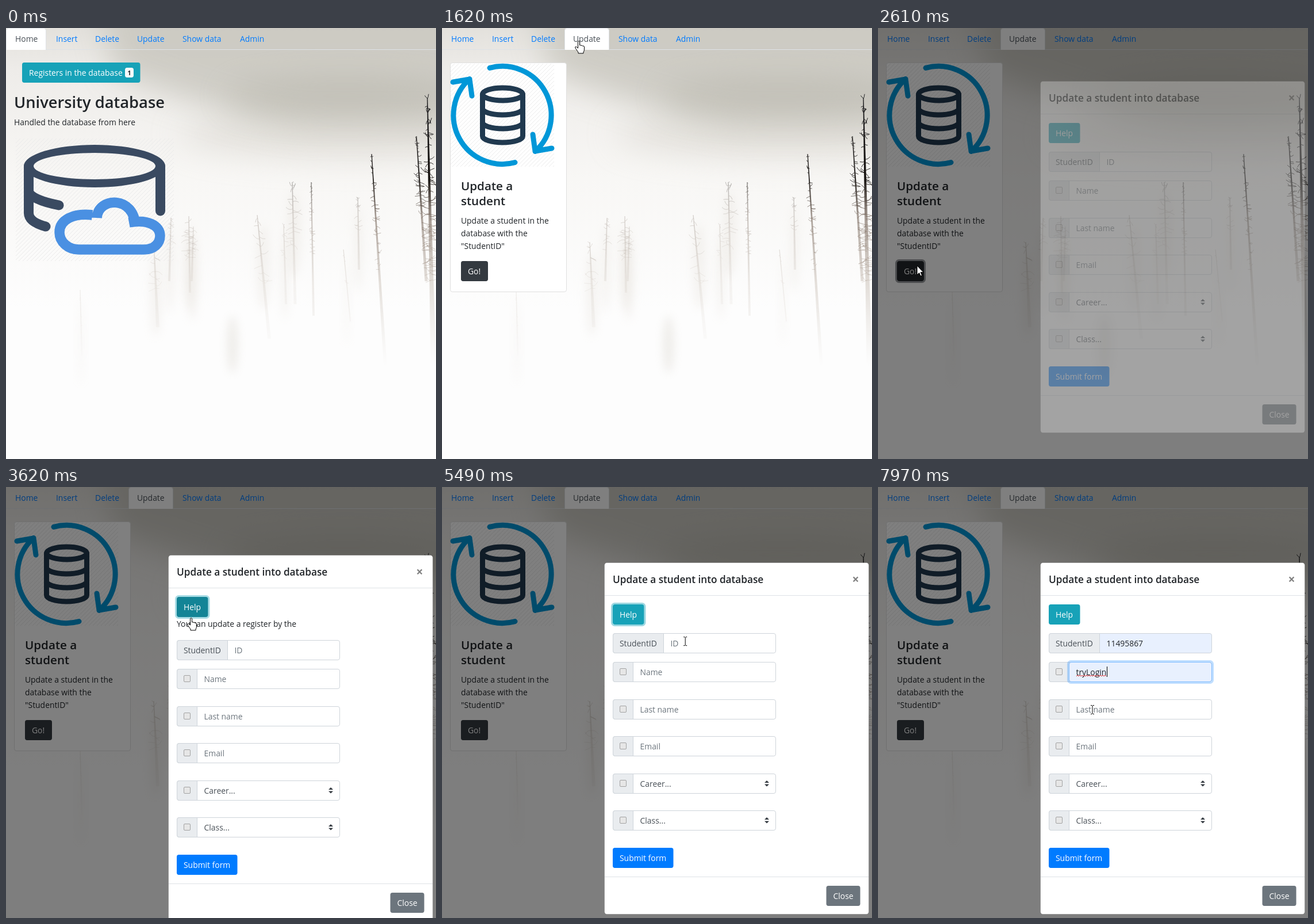
An HTML page that plays this animation: 748x749 px, repeating every 8000 ms.

```html
<!DOCTYPE html>
<html lang="en">
<head>
<meta charset="utf-8">
<title>University database</title>
<style>
html, body { margin: 0; height: 100%; overflow: hidden; background: #fff; }
svg { display: block; width: 748px; height: 749px; }
text { font: 13.9px "Open Sans", "Noto Sans", sans-serif; fill: #212529; white-space: pre; }
.semi { font-weight: 600; }
.bold { font-weight: 700; }
.link { fill: #007bff; }
.white { fill: #fff; }
.gray { fill: #495057; }
.hint { fill: #6c757d; }
.item { font-size: 12px; fill: #111; }
.line { stroke: #dee2e6; }
.box { fill: #fff; stroke: #ced4da; }
.addon { fill: #e9ecef; stroke: #ced4da; }
.round { fill: none; stroke-linecap: round; stroke-linejoin: round; }
#list { filter: drop-shadow(0 2px 2px rgba(0,0,0,.3)); }
</style>
</head>
<body>
<script>
const LOOP = 8000;
const clamp = v => Math.max(0, Math.min(1, v));
const text = (x, y, s, cls = '', more = '') => `<text x="${x}" y="${y}" class="${cls}" ${more}>${s}</text>`;
const rect = (x, y, w, h, more = '') => `<rect x="${x}" y="${y}" width="${w}" height="${h}" ${more}/>`;
const button = (id, x, y, w, fill, label, h = 35) =>
  rect(x, y, w, h, `id="${id}" rx="3.7" fill="${fill}"`) + text(x + 12, y + 23, label, 'white');
const ring = (id, x, y, w, h, glow, edge = 'none') => `<g id="${id}" fill="none" opacity="0">
  ${rect(x - 1.5, y - 1.5, w + 3, h + 3, `rx="5" stroke="${glow}" stroke-width="3"`)}
  ${rect(x + .5, y + .5, w - 1, h - 1, `rx="3.5" stroke="${edge}"`)}</g>`;

// Foggy forest: each tree is a tapered trunk with random twigs; distant ones are blurred and stand in mist
let seed = 7;
const rnd = () => (seed = seed * 16807 % 2147483647) / 2147483647;
function tree([x, y, x2, y2, width, alpha, reach, twigs]) {
  const far = alpha < .6;
  let d = '';
  for (let i = 0; i < twigs; i++) {
    const k = rnd() * .55, side = i % 2 ? 1 : -1;
    const len = reach * (.35 + .65 * rnd()) * Math.min(1, .3 + k * 3) * side;
    d += `M${x + (x2 - x) * k} ${y + (y2 - y) * k}q${len / 2} ${reach * (rnd() - .4) * .5} ${len} ${reach * (rnd() - .5)}`;
  }
  const mist = `<ellipse cx="${(x + x2) / 2}" cy="${y + 90}" rx="${reach * .7}" ry="75" fill="#d8d0c6" opacity=".22" filter="url(#soft)"/>`;
  return `${far ? mist : ''}<g opacity="${alpha}" ${far ? 'filter="url(#haze)"' : ''}>
    <path d="M${x - .6} ${y}h1.2L${x2 + width / 2} ${y2}h${-width}Z" fill="url(#bark)"/>
    <path d="${d}" fill="none" stroke="url(#bark)" stroke-width=".9"/></g>`;
}
const trees = [
  [733, 122, 746, 700, 12, 1, 16, 110], [714, 188, 731, 440, 5, .9, 10, 40],
  [636, 219, 660, 590, 6, .95, 8, 40], [531, 268, 535, 500, 4, .6, 6, 36],
  [498, 268, 503, 480, 5, .32, 17, 26], [483, 342, 487, 480, 4, .32, 9, 12],
  [437, 325, 458, 540, 6, .45, 16, 16], [318, 327, 320, 460, 4, .42, 14, 22],
  [326, 345, 323, 440, 4, .35, 12, 14], [287, 330, 284, 440, 4, .42, 10, 14],
  [257, 372, 264, 520, 6, .5, 14, 18], [612, 294, 614, 420, 4, .35, 9, 18],
  [587, 385, 599, 510, 2, .5, 4, 6], [129, 455, 132, 570, 3, .58, 4, 4]
].map(tree).join('');

const photo = `${rect(0, 0, 748, 749, 'fill="url(#fog)"')}
  <ellipse cx="600" cy="185" rx="300" ry="40" fill="#d9d6cf" opacity=".6" filter="url(#blur)"/>
  <path d="M150 -80H900V172H520C400 160 300 118 190 80Z" fill="#c9c7bf" opacity=".85" filter="url(#blur)"/>
  <ellipse cx="590" cy="118" rx="210" ry="32" fill="#aeaca0" opacity=".4" filter="url(#blur)"/>
  <ellipse cx="394" cy="550" rx="9" ry="50" fill="#dcd8d0" opacity=".45" filter="url(#soft)"/>${trees}`;

const tabs = [['Home', 16], ['Insert', 87], ['Delete', 155], ['Update', 228], ['Show data', 307], ['Admin', 407]];
const tabShape = (x, w) => `M${x + .5} 38V4.5q0 -4 4 -4H${x + w - 4.5}q4 0 4 4V38`;
const nav = `<path d="M0 37.5H748" class="line"/>
  <path id="tabHover" d="${tabShape(213, 78)}" fill="none" stroke="#e9ecef"/>
  <path id="tab" fill="#fff" class="line"/>` + tabs.map(([s, x], i) => text(x, 24, s, 'link', `id="nav${i}"`)).join('');

const home = `<g id="home">${button('registers', 28, 60, 205.5, '#17a2b8', 'Registers in the database')}
  ${rect(207, 69, 15, 17, 'rx="3.7" fill="#f8f9fa"')}
  ${text(214.5, 81.5, '1', 'bold', 'text-anchor="middle" style="font-size:10.5px"')}
  ${text(14, 139, 'University database', 'semi', 'style="font-size:27.3px"')}
  ${text(14, 169, 'Handled the database from here')}
  ${rect(17, 192, 275, 213, 'fill="url(#hatch)"')}
  <path fill="#3a4a61" fill-rule="evenodd" d="M31 240a123 37 0 0 1 246 0a123 37 0 0 1 -246 0ZM48 240a106 23 0 0 0 212 0a106 23 0 0 0 -212 0Z"/>
  <path class="round" stroke="#3a4a61" stroke-width="17" d="M268.500 240V318M39.500 240V322Q40 337 69 345M39.500 285Q46 299 92 308"/>
  <path fill="none" stroke="#4a90e2" stroke-width="17.500" d="M150 325C118 321 93 333 93 355C93 372 108 385 127 385H240C258 385 268 374 268 361C268 343 246 332 214 338M158 330C160 293 224 291 225 345"/></g>`;

const card = `<g id="card">${rect(14.5, 60.5, 202, 398, 'rx="3.7" fill="#fff" stroke="#dfdfdf"')}
  ${rect(15, 62, 180, 179, 'fill="url(#hatch)"')}
  <path class="round" stroke="#0097d8" stroke-width="9" d="M127 233.600A85 85 0 0 1 48 88.400M19 94L48 89L52 118M83 69.400A85 85 0 0 1 162 214.600M191 209L162 214L158 185"/>
  <g class="round" stroke="#20394f" stroke-width="9"><ellipse cx="105.500" cy="115" rx="35" ry="11"/>
  <path d="M70.500 115V188a35 11 0 0 0 70 0V115M70.500 140a35 11 0 0 0 70 0M70.500 164a35 11 0 0 0 70 0"/></g>
  ${text(33, 282, 'Update a', 'semi', 'style="font-size:20.6px"')}
  ${text(33, 308, 'student', 'semi', 'style="font-size:20.6px"')}
  ${['Update a student in the', 'database with the', '"StudentID"'].map((s, i) => text(33, 340 + 22 * i, s)).join('')}
  ${ring('goRing', 33, 405, 47, 35, 'rgba(52,58,64,.5)')}${button('go', 33, 405, 47, '#343a40', 'Go!')}</g>`;

const row = (label, i) => {
  const y = 173 + Math.round(64.6 * i), pick = i > 2;
  return `<g transform="translate(0 ${y})">${rect(297.5, .5, 283, 34, `rx="3.5" class="box" id="field${i}"`)}
    <path class="addon" d="M332.500 .5V34.500H301q-3.500 0 -3.500 -3.500V4q0 -3.500 3.500 -3.500Z"/>
    ${rect(309.5, 11.5, 11, 11, 'rx="1.5" fill="#e6e6e6" stroke="#a3a3a3"')}
    ${text(344.5, 23, label, pick ? 'gray' : 'hint', `id="value${i}"`)}
    ${pick ? '<path fill="#343a40" d="M561 16L565 12L569 16ZM561 18.500L565 22.500L569 18.500Z"/>' : ''}</g>`;
};
const modal = `<g id="modal">
  <rect id="panel" x="282.500" y=".5" width="460" rx="4.500" fill="#fff" stroke="rgba(0,0,0,.2)"/>
  ${text(297, 36, 'Update a student into database', 'semi', 'style="font-size:17.2px"')}
  ${text(719.5, 37, '×', 'bold', 'text-anchor="middle" style="font-size:21px;fill:#808080"')}
  <path d="M283 57.500H742" class="line"/>
  ${ring('helpRing', 297, 73, 54.5, 35, 'rgba(58,176,195,.5)')}${button('help', 297, 73, 54.5, '#17a2b8', 'Help')}
  <g clip-path="url(#fold)">${text(297, 125, 'You can update a register by the')}
  ${text(297, 147, '<tspan class="bold">StudentID</tspan>, to get it go to "Show data" tab')}</g>
  <g id="form">
    ${rect(297.5, 123.5, 283, 34, 'rx="3.5" class="box" id="idField"')}
    <path class="addon" d="M385.500 123.500V157.500H301q-3.500 0 -3.500 -3.500V127q0 -3.500 3.500 -3.500Z"/>
    ${text(309, 146, 'StudentID', 'gray')}${text(397.5, 146, 'ID', 'hint', 'id="idValue"')}
    ${['Name', 'Last name', 'Email', 'Career...', 'Class...'].map(row).join('')}
    ${ring('idRing', 385, 123, 196, 35, 'rgba(0,123,255,.25)', '#80bdff')}
    ${ring('nameRing', 332, 173, 249, 35, 'rgba(0,123,255,.25)', '#80bdff')}
    ${button('submit', 297, 496, 105.5, '#007bff', 'Submit form')}
    <path d="M283 546.500H742" class="line"/>
    ${button('close', 668.5, 562, 59, '#6c757d', 'Close')}
  </g></g>`;

const wave = 'M345 329' + 'l2 -2l2 2'.repeat(13);
const list = `<g id="list">${rect(332, 341, 250, 214, 'rx="2" fill="#fff"')}${rect(332, 348, 250, 33.2, 'id="mark" fill="#ececec"')}
  ${['hola', 'tryLogin', 'Lol', 'nn', 'nelbo', 'hgdfgfsgdsfgsdfg'].map((s, i) => text(344, 368.5 + 33.2 * i, s, 'item')).join('')}</g>`;

document.body.innerHTML = `<svg viewBox="0 0 748 749"><defs>
  <linearGradient id="fog" x2="0" y2="1"><stop stop-color="#e3e1dc"/><stop offset=".1" stop-color="#eeece9"/>
    <stop offset=".35" stop-color="#f8f7f5"/><stop offset=".65" stop-color="#fdfdfd"/></linearGradient>
  <linearGradient id="bark" gradientUnits="userSpaceOnUse" x1="0" y1="120" x2="0" y2="640">
    <stop stop-color="#111114"/><stop offset=".28" stop-color="#1c1815"/><stop offset=".4" stop-color="#75655a" stop-opacity=".65"/>
    <stop offset=".62" stop-color="#b0a294" stop-opacity=".35"/><stop offset=".9" stop-color="#c8c0b6" stop-opacity="0"/></linearGradient>
  <filter id="blur" x="-30%" y="-100%" width="160%" height="300%"><feGaussianBlur stdDeviation="27"/></filter>
  <filter id="soft" x="-200%" y="-50%" width="500%" height="200%"><feGaussianBlur stdDeviation="8"/></filter>
  <filter id="haze" x="-50%" width="200%"><feGaussianBlur stdDeviation=".7"/></filter>
  <pattern id="hatch" width="7" height="7" patternUnits="userSpaceOnUse"><path d="M-1 8L8 -1" stroke="#e9e9e9" stroke-width=".9"/></pattern>
  <clipPath id="fold"><rect id="foldBox" x="290" y="108" width="445"/></clipPath></defs>
  ${photo}${nav}${home}${card}${rect(0, 0, 748, 749, 'id="shade"')}${modal}
  <path id="wave" d="${wave}" fill="none" stroke="#e03030"/>${rect(0, 0, 1, 18, 'id="caret"')}${list}
  <path id="cursor" stroke="#000" stroke-linejoin="round"/></svg>`;

const pointers = {
  arrow: 'M0 0V16L3.700 12.500L6 18L8.500 17L6.200 11.600H11Z',
  hand: 'M-1.500 1.500Q0 -.5 1.500 1.500V8Q3 7 4 8.500Q5.500 7.500 6.700 9.200Q9.500 8.500 9.500 11V15Q9.500 18 8 20V22H-1V20L-6 13Q-7 10 -4.500 10.500L-1.500 13Z',
  beam: 'M-3 -7.500H-1L0 -6.500L1 -7.500H3M0 -6.500V6.500M-3 7.500H-1L0 6.500L1 7.500H3'
};
const shapes = [[0, 'arrow'], [570, 'hand'], [720, 'arrow'], [790, 'hand'], [1780, 'arrow'], [1950, 'beam'], [2120, 'hand'],
  [2380, 'arrow'], [3380, 'hand'], [3640, 'beam'], [4560, 'hand'], [5180, 'arrow'], [5400, 'beam'], [6950, 'arrow'], [7640, 'beam']];
const route = [[220, 624, 699], [600, 150, 88], [840, 220, 27], [990, 220, 27], [1070, 238, 22], [1640, 238, 22], [1990, 58, 373],
  [2070, 58, 373], [2220, 68, 413], [2620, 68, 413], [3150, 345, 262], [3230, 345, 262], [3450, 322, 227], [4480, 322, 227],
  [4700, 318, 208], [5100, 318, 208], [5560, 430, 272], [6050, 430, 272], [6400, 399, 320], [6810, 399, 320],
  [7120, 400, 363], [7350, 400, 363], [7500, 397, 394], [7640, 397, 394], [7970, 373, 387]];

function bezier(x1, y1, x2, y2) {
  const at = (a, b, s) => 3 * a * s * (1 - s) ** 2 + 3 * b * s * s * (1 - s) + s ** 3;
  return p => {
    let lo = 0, hi = 1;
    for (let i = 0; i < 20; i++) {
      const mid = (lo + hi) / 2;
      if (at(x1, x2, mid) < clamp(p)) lo = mid; else hi = mid;
    }
    return at(y1, y2, lo);
  };
}
const ease = bezier(.25, .1, .25, 1), easeOut = bezier(0, 0, .58, 1);

const $ = id => document.getElementById(id);
const set = (id, attrs) => { for (const k in attrs) $(id).setAttribute(k, attrs[k]); };
const show = (id, on) => set(id, { opacity: +on });
const write = (id, s, cls) => { $(id).textContent = s; set(id, { class: cls }); };
const last = (keys, t) => keys.filter(k => k[0] <= t).pop();
const mix = (a, b, k) => `rgb(${a.map((v, i) => Math.round(v + (b[i] - v) * k))})`;
const TEAL = [23, 162, 184], DEEP = [19, 132, 150];

function draw(t) {
  const within = (a, b) => t >= a && t < b;
  const fade = (a, b = 1e5) => clamp((t - a) / 150) - clamp((t - b) / 150);

  // Page
  const updating = t >= 1220;
  set('tab', { d: updating ? tabShape(213, 78) : tabShape(0, 70) });
  set('nav0', { class: updating ? 'link' : 'gray' });
  set('nav3', { class: updating ? 'gray' : 'link' });
  show('tabHover', within(790, 1220));
  set('registers', { fill: mix(TEAL, DEEP, fade(570, 720)) });
  show('home', 1 - fade(1220));
  show('card', fade(1390));
  set('go', { fill: mix([52, 58, 64], [35, 39, 43], fade(2120, 2630)) });
  show('goRing', fade(2370, 2660));
  show('shade', fade(2420) * .5);

  // Dialog
  const fold = 44 * (ease((t - 3505) / 350) - ease((t - 5000) / 350));
  const top = 131 - fold / 2 - 50 * (1 - easeOut((t - 2568) / 300));
  set('modal', { transform: `translate(0 ${Math.round(top)})`, opacity: fade(2568) });
  set('panel', { height: 611 + fold });
  set('form', { transform: `translate(0 ${Math.round(fold)})` });
  set('foldBox', { height: fold });
  set('help', { fill: mix(TEAL, DEEP, fade(3380, 3640) + fade(4560, 5180)) });
  show('helpRing', fade(3490, 5560));

  // Fields
  const filled = t >= 6050, name = t < 7050 ? '' : t < 7430 ? 'hola' : 'tryLogin';
  const tint = on => ({ style: `fill:${on ? '#e8f0fe' : '#fff'}` });
  set('idField', tint(filled));
  write('idValue', filled ? '11495867' : 'ID', filled ? '' : 'hint');
  set('field0', tint(name));
  write('value0', name || 'Name', name ? '' : 'hint');
  show('idRing', fade(5560, 6400));
  show('nameRing', fade(6470));
  show('list', within(6520, 7640));
  set('mark', { y: t < 7430 ? 348 : 381.2, opacity: name ? 1 : 0 });
  const done = t >= 7640;
  show('wave', done);
  show('caret', within(5600, 6050) || within(6480, 7050) || done);
  set('caret', t < 6400 ? { x: 397, y: 263 } : { x: done ? 398 : 344, y: 312 });

  // Pointer
  const from = last(route, t) || route[0], to = route[route.indexOf(from) + 1] || from;
  let k = clamp((t - from[0]) / (to[0] - from[0] || 1));
  k = k * k * (3 - 2 * k);
  const [x, y] = [1, 2].map(i => from[i] + (to[i] - from[i]) * k);
  const shape = last(shapes, t)[1];
  set('cursor', { d: pointers[shape], fill: shape === 'beam' ? 'none' : '#fff',
    transform: `translate(${x} ${y})`, opacity: +(t > 220) });
}

function tick(now) {
  draw(now % LOOP);
  requestAnimationFrame(tick);
}
draw(0);
requestAnimationFrame(tick);
</script>
</body>
</html>
```
